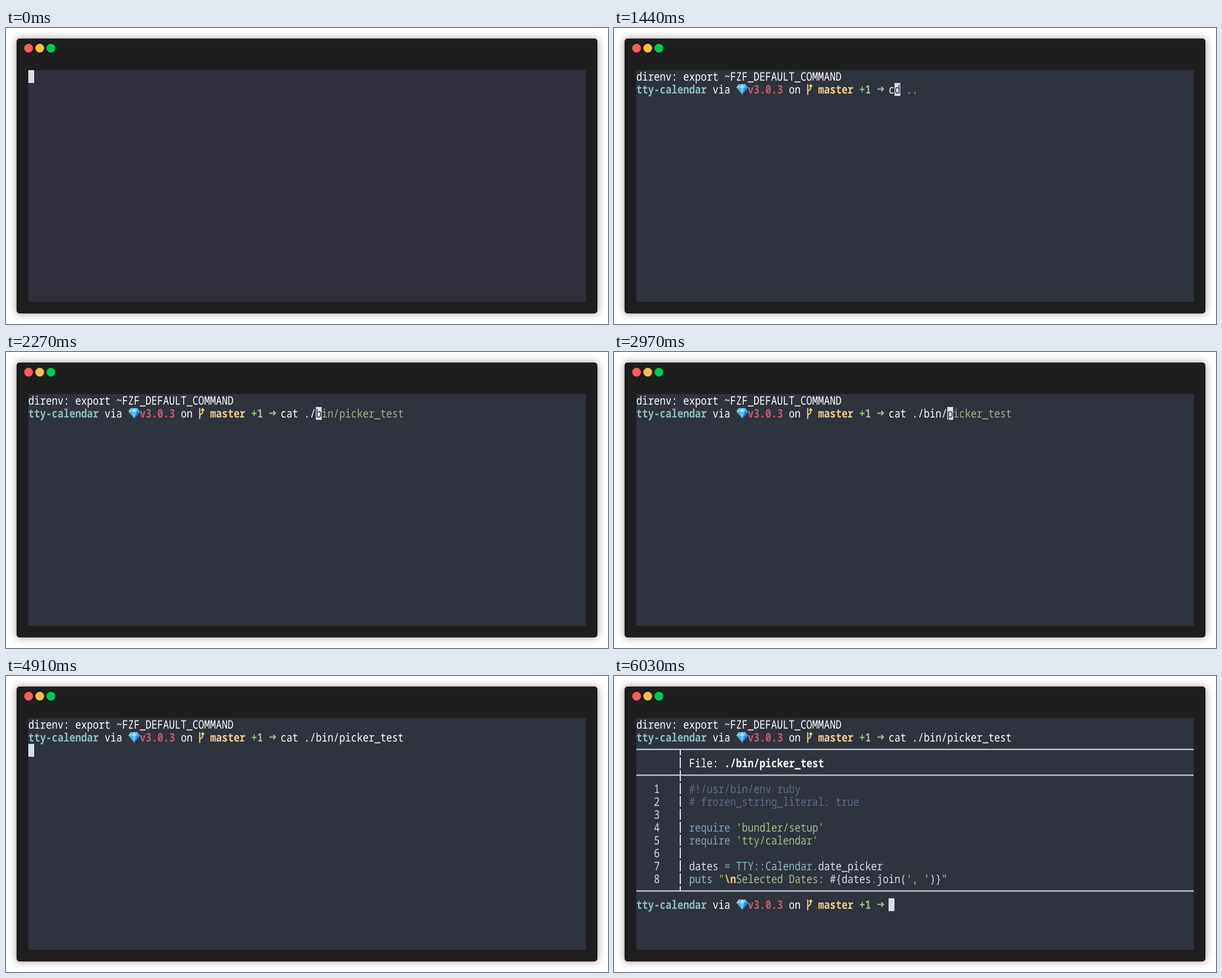
Animation, 1026 px wide and 506 px high, one loop 8000 ms. Source, as an HTML page:

```html
<!DOCTYPE html>
<html lang="en">
<head>
<meta charset="utf-8">
<title>Terminal session</title>
<style>
html, body { margin: 0; width: 100%; height: 100%; overflow: hidden; background: #fff; }
svg { display: block; width: 1026px; height: 506px; }
.win { filter: drop-shadow(0 0 7px rgba(0, 0, 0, .4)); }
text {
  font: 16.6667px "Noto Sans Mono", "DejaVu Sans Mono", monospace;
  white-space: pre;
  text-rendering: geometricPrecision;
}
.b { font-weight: 700; }
</style>
</head>
<body>
<svg viewBox="0 0 1026 506">
  <rect class="win" x="18" y="18" width="990" height="470" rx="5" fill="#1e1e1e"/>
  <circle cx="38.5" cy="34.5" r="7.5" fill="#ff5c5c"/>
  <circle cx="57.5" cy="34.5" r="7.5" fill="#ffbd4a"/>
  <circle cx="76.5" cy="34.5" r="7.5" fill="#00ca56"/>
  <rect id="back" x="38" y="72" width="950" height="396"/>
  <g id="screen"></g>
</svg>
<script>
const LOOP = 8000, CW = 10, RH = 22, LEFT = 38, TOP = 72, CMD_COL = 43;
const C = {
  bg: '#2f333e', white: '#ffffff', fg: '#d8dee9', cursor: '#d8dee9',
  teal: '#8fbcbb', blue: '#81a1c1', cyan: '#88c0d0', red: '#bf616a',
  yellow: '#ebcb8b', green: '#a3be8c', hint: '#a3b48b', grey: '#616e88'
};
const COMMAND = 'cat ./bin/picker_test';

// Time of each typed character; the last key accepts the suggestion.
const KEYS = [1440, 1530, 1690, 1780, 2090, 2270, 2370, 2500, 2700, 2970,
  3270, 3500, 3610, 3720, 3830, 3900];
const T = { direnv: 140, prompt: 370, accept: 4170, enter: 4910, output: 5800, done: 6030 };

const back = document.getElementById('back');
const screen = document.getElementById('screen');
const px = col => LEFT + col * CW;
const py = row => TOP + row * RH;

function text(row, col, str, color, bold) {
  return `<text class="${bold ? 'b' : ''}" fill="${color}" ` +
    `transform="translate(${px(col)} ${py(row) + 18}) scale(1 1.2)">${str}</text>`;
}

// Adjacent runs: [string, colour, bold]
function runs(row, col, list) {
  let out = '';
  for (const [str, color, bold] of list) {
    out += text(row, col, str, color, bold);
    col += str.length;
  }
  return out;
}

const rect = (x, y, w, h, color) =>
  `<rect x="${x}" y="${y}" width="${w}" height="${h}" fill="${color}"/>`;

function cursor(row, col, ch = '') {
  return rect(px(col), py(row), CW, RH, C.cursor) + (ch ? text(row, col, ch, C.bg) : '');
}

function gem(row) {
  const face = (d, color) => `<path d="${d}" fill="${color}"/>`;
  return `<g transform="translate(${px(17)} ${py(row)})">` +
    face('M4.5 2H16L20.5 8L10.5 19.5L.5 8Z', '#3fa9f0') +
    face('M4.5 2L.5 8H6Z', '#8ed4fa') +
    face('M4.5 2H10.5L6 8Z', '#5fbdf6') +
    face('M10.5 2L6 8H14.5Z', '#b5e5fd') +
    face('M10.5 2H16L14.5 8Z', '#6cc5f8') +
    face('M6 8H14.5L10.5 19.5Z', '#66bff5') +
    face('M14.5 8H20.5L10.5 19.5Z', '#2b86d2') + '</g>';
}

function icons(row) {
  const stroke = (col, d, color) =>
    `<path transform="translate(${px(col)} ${py(row)})" d="${d}" ` +
    `fill="none" stroke="${color}" stroke-width="2"/>`;
  return gem(row) +
    stroke(29, 'M2.2 2V20.5M2.2 15.5C2.2 12 7.3 12.5 7.3 8V3M4.8 6L7.3 3L9.8 6', C.yellow) +
    stroke(41, 'M1 10.5H11M7.5 6.8L11.2 10.5L7.5 14.2', C.green);
}

function prompt(row) {
  return text(row, 0, 'tty-calendar', C.teal, true) +
    text(row, 13, 'via', C.white) +
    text(row, 19, 'v3.0.3', C.red, true) +
    text(row, 26, 'on', C.white) +
    text(row, 31, 'master', C.yellow, true) +
    text(row, 38, '+1', C.green, true) + icons(row);
}

function commandLine(n) {
  const typed = COMMAND.slice(0, n);
  const hint = n === 1 ? 'd ..' : n > 2 ? COMMAND.slice(n) : '';
  const col = CMD_COL + n;
  return text(1, CMD_COL, typed, C.white) +
    text(1, col + 1, hint.slice(1), C.hint) +
    cursor(1, col, hint.charAt(0).trim());
}

const CODE = [
  [['#!/usr/bin/env ruby', C.grey]],
  [['# frozen_string_literal: true', C.grey]],
  [],
  [['require ', C.blue], ["'bundler/setup'", C.green]],
  [['require ', C.blue], ["'tty/calendar'", C.green]],
  [],
  [['dates ', C.fg], ['= ', C.blue], ['TTY', C.teal], ['::', C.blue],
    ['Calendar', C.teal], ['.', C.blue], ['date_picker', C.fg]],
  [['puts ', C.cyan], ['"', C.green], ['\\n', C.yellow, true], ['Selected Dates: ', C.green],
    ['#{dates', C.fg], ['.', C.blue], ['join(', C.fg], ["', '", C.green],
    [')}', C.fg], ['"', C.green]]
];

function listing() {
  let out = '';
  for (const row of [2, 4, 13]) out += rect(LEFT, py(row) + 8.5, 950, 2, C.fg);
  for (let row = 2; row <= 13; row++) {
    const from = row === 2 ? 9 : 1, to = row === 13 ? 9 : 20;
    out += rect(px(7) + 4, py(row) + from, 2, to - from, C.fg);
  }
  out += runs(3, 9, [['File: ', C.white], ['./bin/picker_test', C.white, true]]);
  CODE.forEach((line, i) => {
    out += text(5 + i, 3, String(i + 1), C.fg) + runs(5 + i, 9, line);
  });
  return out;
}

function render(t) {
  if (t < T.direnv) return cursor(0, 0);
  let out = text(0, 0, 'direnv: export ~FZF_DEFAULT_COMMAND', C.white);
  if (t < T.prompt) return out + cursor(1, 0);
  out += prompt(1);
  if (t < T.enter) {
    const n = t < T.accept ? KEYS.filter(k => k <= t).length : COMMAND.length;
    return out + commandLine(n);
  }
  out += text(1, CMD_COL, COMMAND, C.white);
  if (t < T.output) return out + cursor(2, 0);
  out += listing();
  if (t < T.done) return out + cursor(14, 0);
  return out + prompt(14) + cursor(14, CMD_COL);
}

let shown = null;
function draw(t) {
  const markup = render(t);
  if (markup === shown) return;
  shown = markup;
  back.setAttribute('fill', t < T.direnv ? '#2f303b' : C.bg);
  screen.innerHTML = markup;
}

const start = performance.now();
function tick() {
  draw((performance.now() - start) % LOOP);
  requestAnimationFrame(tick);
}
tick();
</script>
</body>
</html>
```
